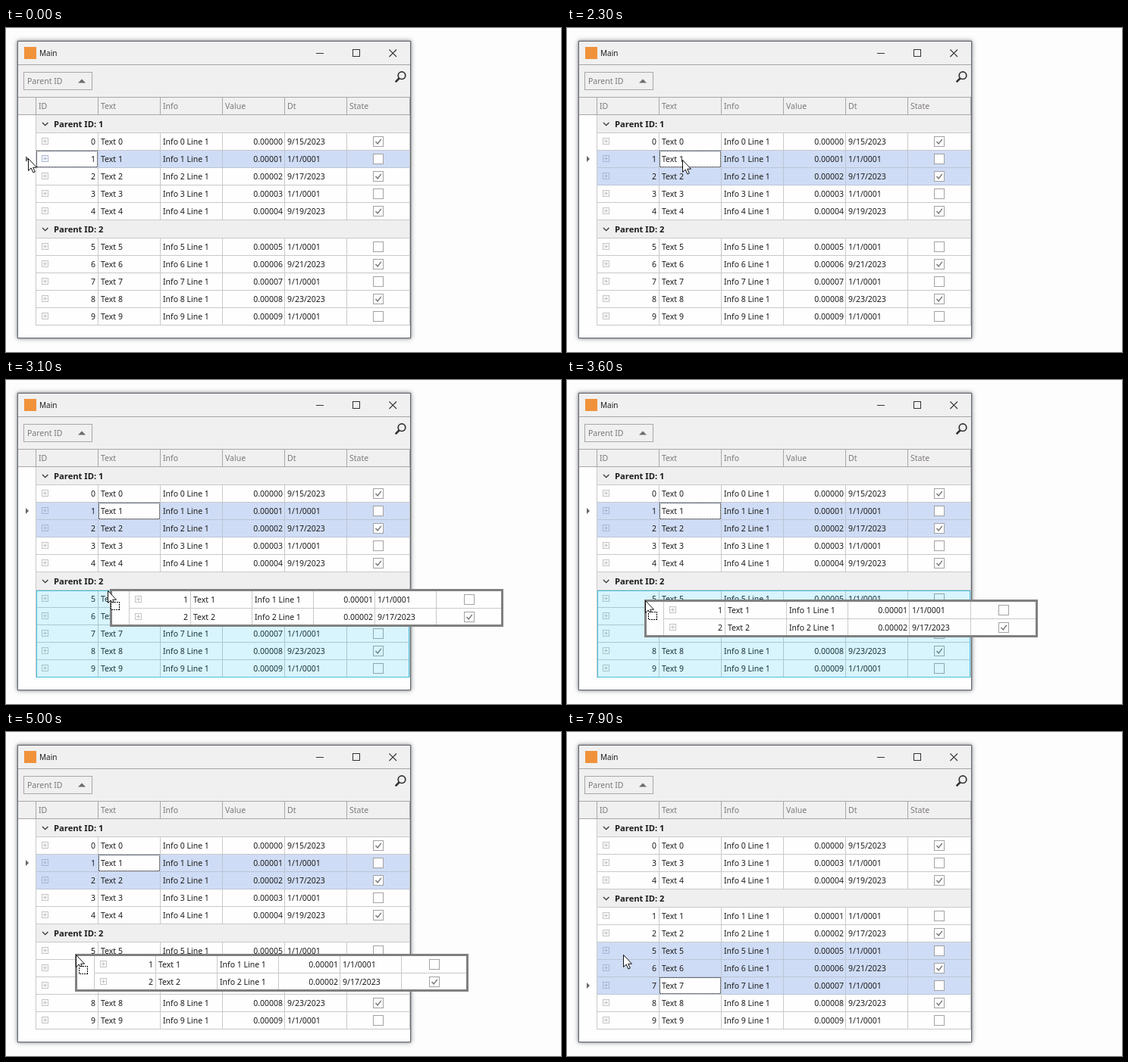
An HTML page that plays this animation: 732x428 px, repeating every 8 s.

```html
<!DOCTYPE html>
<html lang="en">
<head>
<meta charset="utf-8">
<title>Grid row drag and drop</title>
<style>
  html, body { margin: 0; width: 100%; height: 100%; overflow: hidden; background: #fdfdfd; }
  svg { display: block; width: 732px; height: 428px; }
  text { font: 10.5px "Noto Sans", "Open Sans", sans-serif; fill: #1c1c1c; white-space: pre; }
  rect, .line { shape-rendering: crispEdges; }
  .window { filter: drop-shadow(0 0 1px rgba(40, 45, 55, .5)) drop-shadow(0 0 3px rgba(40, 45, 55, .5)); }
  .panel { fill: #f0f0f0; }
  .edge { fill: none; stroke: #666a70; }
  .line { stroke: #c9c9c9; fill: none; }
  .rule { stroke: #a9a6a9; fill: none; }
  .muted { fill: #7d787d; }
  .title { font-size: 10px; }
  .group text { font-size: 11.2px; font-weight: 700; }
  .group rect { fill: #f0eff0; }
  .glyph { fill: none; stroke: #333; }
  .back { fill: #fefefe; }
  .plus { stroke: #c4c4c4; }
  .selected .back { fill: #cfdcf5; }
  .selected .line { stroke: #bcc5d6; }
  .selected .plus { stroke: #a9b6d2; }
  .box { fill: #fefefe; stroke: #a3a3a3; }
  .tick { fill: none; stroke: #777; stroke-width: 1.5; }
  .focus { fill: #fefefe; stroke: #000; stroke-dasharray: 1 1; stroke-dashoffset: .5; }
  .target { fill: #00bef0; fill-opacity: .15; stroke: #45c1de; }
  .frame { fill: none; stroke: #808080; stroke-width: 3; }
</style>
</head>
<body>
<svg viewBox="0 0 732 428" xmlns="http://www.w3.org/2000/svg">
  <g class="window"><rect class="panel" x="15" y="17" width="519" height="393"/></g>
  <rect class="back" x="16" y="115" width="517" height="294"/>
  <rect x="24" y="25" width="16" height="16" fill="#f0923a"/>
  <text class="title" x="44" y="37">Main</text>
  <path class="glyph" shape-rendering="crispEdges" d="M409 33.5h10M457.5 28.5h9v9h-9z"/>
  <path class="glyph" stroke-width="1.2" d="M505.5 28.5l9.500 9.500m0-9.500l-9.500 9.500"/>
  <rect class="rule" x="23.5" y="58.5" width="90" height="23"/>
  <text class="muted" x="28" y="74">Parent ID</text>
  <path d="M95 72.5l5-5 5 5z" fill="#6c6c6c"/>
  <g class="glyph">
    <circle cx="522" cy="62.700" r="4.800" stroke-width="1.700"/>
    <path d="M518.500 66.500l-4.800 4.800" stroke-width="2.600"/>
  </g>
  <path class="line rule" d="M16 48.5h517M16 91.5h517M16 114.5h517M532.5 92v22"/>
  <g id="head"></g>
  <g id="grid"></g>
  <path class="line" d="M39.5 115V393M532.5 115V393"/>
  <rect class="edge" x="15.5" y="17.5" width="518" height="392"/>
  <path id="marker" d="M26-4l4 4-4 4z" fill="#666"/>
  <rect id="target" class="target" x="40.5" y="278.5" width="491" height="114"/>
  <g id="ghost"><rect class="back" width="519" height="50"/></g>
  <g id="cursor">
    <path d="M.5 .5V16.5L4.200 13 6.900 19 9.300 18 6.700 12.200H11.5Z" fill="#fff" stroke="#111"/>
    <rect id="carry" x="4.5" y="15.5" width="11" height="10" rx="1" fill="#fff" stroke="#000" stroke-width="1.300" stroke-dasharray="2 1"/>
  </g>
</svg>
<script>
const LOOP = 8000, STEP = 100, ROW = 23;
const $ = id => document.getElementById(id);

function add(parent, tag, attrs, text) {
  const node = document.createElementNS('http://www.w3.org/2000/svg', tag);
  for (const key in attrs) node.setAttribute(key, attrs[key]);
  if (text !== undefined) node.textContent = text;
  return parent.appendChild(node);
}
const label = (parent, x, y, text, anchor = 'start') =>
  add(parent, 'text', { x, y, 'text-anchor': anchor }, text);
const place = (node, x, y) => node.setAttribute('transform', `translate(${x} ${y})`);
const show = (node, on) => { node.style.display = on ? '' : 'none'; };

// One data row; left is the first column line, pitch the column width.
function addRow(parent, id, left, pitch, right) {
  const g = add(parent, 'g', {});
  const col = k => left + pitch * k;
  add(g, 'rect', { class: 'back', x: left + 1, width: right - left, height: 22 });
  let lines = `M${left} 22.5H${right}`;
  for (let k = 0; k < 6; k++) lines += `M${col(k) + .5} 0v22`;
  add(g, 'path', { class: 'line', d: lines });
  const focus = add(g, 'rect', { class: 'focus', y: .5, width: pitch - 2, height: 21 });
  show(focus, false);
  add(g, 'path', { class: 'line plus', d: `M${left + 8.5} 6.5h8v8h-8zM${left + 10} 10.5h5m-2.5 -2.5v5` });
  label(g, col(1) - 3, 15, id, 'end');
  label(g, col(1) + 4, 15, `Text ${id}`);
  label(g, col(2) + 4, 15, `Info ${id} Line 1`);
  label(g, col(4) - 2, 15, `0.0000${id}`, 'end');
  label(g, col(4) + 4, 15, id % 2 ? '1/1/0001' : `9/${15 + id}/2023`);
  const x = Math.round((col(5) + right) / 2) - 7;
  add(g, 'rect', { class: 'box', x: x + .5, y: 4.5, width: 13, height: 13 });
  if (id % 2 === 0) add(g, 'path', { class: 'tick', d: `M${x + 3.5} 11l2.7 2.9 4.6 -6` });
  return { g, focus, col };
}

function addGroup(id) {
  const g = add($('grid'), 'g', { class: 'group' });
  add(g, 'rect', { x: 40, width: 492, height: ROW });
  add(g, 'path', { class: 'line', d: 'M40 23.5H532' });
  add(g, 'path', { class: 'glyph', 'stroke-width': 1.3, d: 'M48 10l3.7 3.7 3.7 -3.7' });
  label(g, 63, 16, `Parent ID: ${id}`);
  return g;
}

['ID', 'Text', 'Info', 'Value', 'Dt', 'State'].forEach((name, k) => {
  const x = 39 + 82 * k;
  add($('head'), 'path', { class: 'line rule', d: `M${x + .5} 92v22` });
  label($('head'), x + 4, 107, name).setAttribute('class', 'muted');
});

const groups = [addGroup(1), addGroup(2)];
const rows = Array.from({ length: 10 }, (_, id) => addRow($('grid'), id, 39, 82, 532));
[1, 2].forEach((id, k) => place(addRow($('ghost'), id, 25, 81, 518).g, 0, 3 + ROW * k));
add($('ghost'), 'rect', { class: 'frame', x: 1.5, y: 1.5, width: 516, height: 47 });

const clicks = [
  { at: 0, picked: [1], row: 1, col: 0 },
  { at: 1200, picked: [1, 2], row: 2, col: 0 },
  { at: 2200, picked: [1, 2], row: 1, col: 1 },
  { at: 6600, picked: [5], row: 5, col: 1 },
  { at: 7400, picked: [5, 6, 7], row: 7, col: 1 }
];
const drag = { from: 2400, over: 3000, out: 5000, drop: 5100, release: 5800 };

// Pointer moves: start, end, x, y
const moves = [
  [0, 200, 27, 172], [400, 900, 28, 196], [1400, 2000, 152, 174],
  [2300, 2500, 160, 196], [2500, 2700, 155, 251], [2700, 2800, 153, 257],
  [2800, 3000, 138, 277], [3000, 3500, 103, 291], [3600, 4000, 92, 294],
  [5700, 6300, 33, 294], [6500, 7200, 33, 332], [7500, 7900, 74, 294]
];

function pointer(t) {
  let x = 29, y = 172;
  for (const [from, to, toX, toY] of moves) {
    const u = Math.min(1, Math.max(0, (t - from) / (to - from)));
    const f = u * u * (3 - 2 * u);
    x += (toX - x) * f;
    y += (toY - y) * f;
  }
  return [Math.round(x), Math.round(y)];
}

function layout(dropped) {
  const moved = id => id === 1 || id === 2;
  const inSecond = id => id > 4 || (dropped && moved(id));
  let y = 115;
  groups.forEach((group, k) => {
    place(group, 0, y);
    y += ROW + 1;
    rows.forEach((row, id) => {
      if (inSecond(id) !== (k === 1)) return;
      place(row.g, 0, row.y = y);
      y += ROW;
    });
  });
}

function draw(t) {
  layout(t >= drag.drop);
  const now = clicks.filter(c => c.at <= t).pop();
  rows.forEach((row, id) => {
    row.g.setAttribute('class', now.picked.includes(id) ? 'selected' : '');
    row.focus.setAttribute('x', row.col(now.col) + 1.5);
    show(row.focus, id === now.row);
  });
  place($('marker'), 0, rows[now.row].y + 11);
  show($('target'), t >= drag.over && t < drag.out);
  show($('ghost'), t >= drag.from && t < drag.drop);
  show($('carry'), t >= drag.from && t < drag.release);
  // The dragged rows trail the pointer by one step.
  const [x, y] = pointer(t - STEP);
  place($('ghost'), x - 1, y - 1);
  place($('cursor'), ...pointer(t));
}

const start = performance.now();
let last = -1;
function tick() {
  const t = Math.floor((performance.now() - start) % LOOP / STEP) * STEP;
  if (t !== last) draw(last = t);
  requestAnimationFrame(tick);
}
tick();
</script>
</body>
</html>
```
